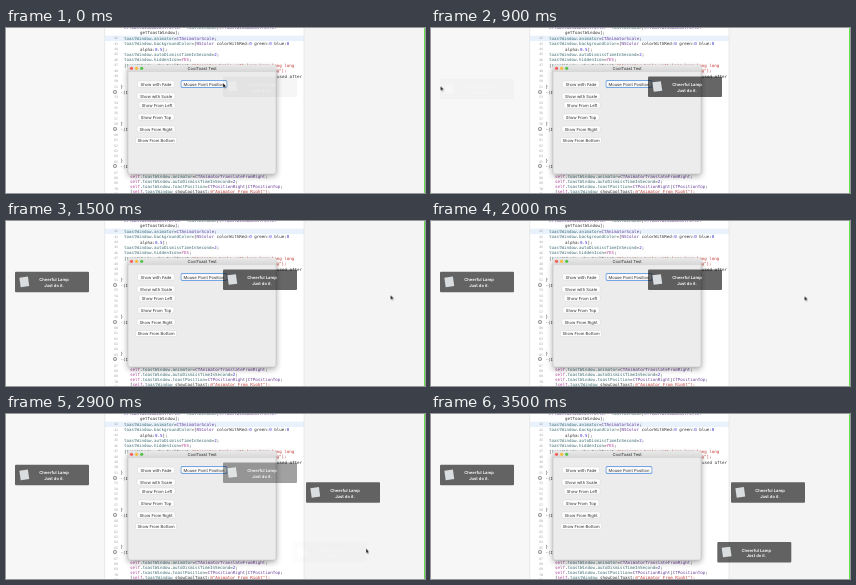
An HTML page for the animation above (3600 ms loop, 419 by 165 pixels).

```html
<!DOCTYPE html>
<html lang="en">
<head>
<meta charset="utf-8">
<title>Toast demo</title>
<style>
html, body { margin: 0; width: 100%; height: 100%; overflow: hidden; background: #f6f6f6; }
svg { display: block; width: 419px; height: 165px; }
text { text-rendering: geometricPrecision; white-space: pre; }
.code { font: 4.16px "DejaVu Sans Mono", monospace; fill: #333; }
.num { font: 3.2px "DejaVu Sans Mono", monospace; fill: #a2a2a2; text-anchor: end; }
.ui { font: 4.15px Inter, "Liberation Sans", sans-serif; fill: #2b2b2b; text-anchor: middle; }
.str { fill: #c43a34; }
.key { fill: #b0409a; }
.val { fill: #3a35cf; }
.type { fill: #6a3f99; }
.var { fill: #3f6e74; }
.btn { fill: #fff; stroke: #cfcfcf; stroke-width: .4; }
.toast text { fill: #fff; }
.toast .head { font-weight: 600; }

.toast, .cursor { animation: 3.6s linear infinite; }
#t1 { animation-name: first; }
#t2 { animation-name: second; }
#t3 { animation-name: third; }
#t4 { animation-name: fourth; }
.cursor { animation-name: roam; }

@keyframes first {
  0% { opacity: .06; }
  8.33% { opacity: .68; }
  15.28%, 75% { opacity: 1; }
  80.56% { opacity: .62; }
  88.89%, 100% { opacity: 0; }
}
@keyframes second {
  0%, 24.3% { opacity: 0; }
  25% { opacity: .03; }
  33.33% { opacity: .65; }
  39.5%, 100% { opacity: 1; }
}
@keyframes third {
  0%, 55.55% { opacity: 0; }
  63.89% { opacity: .55; }
  70.8%, 100% { opacity: 1; }
}
@keyframes fourth {
  0%, 80% { opacity: 0; }
  80.56% { opacity: .02; }
  88.89% { opacity: .65; }
  95.5%, 100% { opacity: 1; }
}
@keyframes roam {
  0%, 8.5% { transform: translate(217px, 55px); animation-timing-function: ease-in-out; }
  16.7%, 31% { transform: translate(9.5px, 58px); animation-timing-function: ease-in-out; }
  40%, 43% { transform: translate(384.5px, 74px); animation-timing-function: ease-in-out; }
  52%, 70% { transform: translate(373.5px, 75px); animation-timing-function: ease-in-out; }
  78%, 86% { transform: translate(360px, 134.5px); animation-timing-function: ease-in; }
  95%, 100% { transform: translate(391px, 168px); }
}
</style>
</head>
<body>
<svg viewBox="0 0 419 165">
  <defs>
    <filter id="blur" x="-20%" y="-20%" width="140%" height="140%"><feGaussianBlur stdDeviation="3"/></filter>
    <linearGradient id="bar" x2="0" y2="1">
      <stop stop-color="#e9e9e9"/><stop offset="1" stop-color="#d8d8d8"/>
    </linearGradient>
  </defs>
  <rect width="419" height="165" fill="#f7f7f7"/>
  <rect x="298" width="121" height="165" fill="#f4f4f4"/>
  <rect x="99" width="199" height="165" fill="#fff"/>
  <rect x="99" y="7.7" width="199" height="5.4" fill="#e9f2fc"/>
  <path d="M98.7 0V165M298 0V165" stroke="#dedede" stroke-width=".6"/>
  <g id="code"></g>

  <rect x="122" y="40" width="148" height="108" rx="2" opacity=".38" filter="url(#blur)"/>
  <rect x="122" y="37" width="148" height="109" rx="2" fill="#ececec" stroke="#bdbdbd" stroke-width=".5"/>
  <path d="M122 43.5V39q0-2 2-2h144q2 0 2 2v4.5z" fill="url(#bar)"/>
  <path d="M122 43.6H270" stroke="#c4c4c4" stroke-width=".4"/>
  <circle cx="125.5" cy="40.3" r="1.6" fill="#f5615a"/>
  <circle cx="130.6" cy="40.3" r="1.6" fill="#f3bd3e"/>
  <circle cx="135.7" cy="40.3" r="1.6" fill="#55c34a"/>
  <text class="ui" x="196" y="41.9">CoolToast Test</text>
  <g id="buttons"></g>
  <g id="toasts"></g>
  <path class="cursor" d="M0 0V4.7L1.1 3.7L1.9 5.4L2.7 5L1.9 3.4H3.4Z" fill="#111" stroke="#fff" stroke-width=".35"/>
  <rect x="418" width="1" height="165" fill="#66e04c"/>
</svg>
<script>
const el = id => document.getElementById(id);
const escape = s => s.replace(/&/g, "&amp;").replace(/</g, "&lt;");
const kinds = ["str", "key", "type", "var", "val"];
const token = /(@".*)|\b(self|YES)\b|\b(NSColor|CT\w+)|\b(toastWindow|animator|backgroundColor|autoDismissTimeInSecond|hiddenIcon|toastPosition)\b|\b(\d[\d.]*)/g;

const paint = s => escape(s).replace(token, (m, ...g) =>
  `<tspan class="${kinds[g.slice(0, 5).findIndex(Boolean)]}">${m}</tspan>`);
const line = (x, y, s) => `<text class="code" x="${x}" y="${y + 1.5}">${paint(s)}</text>`;

// Source lines: left edge, vertical centre, text
const lines = [
  [118, -.7, "CTToastWindowController *toastWindow=[CTToastWindowController"],
  [134, 4.7, "getToastWindow];"],
  [118, 10.2, "toastWindow.animator=CTAnimatorScale;"],
  [118, 15.7, "toastWindow.backgroundColor=[NSColor colorWithRed:0 green:0 blue:0"],
  [134, 21, "alpha:0.5];"],
  [118, 26.4, "toastWindow.autoDismissTimeInSecond=2;"],
  [118, 31.8, "toastWindow.hiddenIcon=YES;"],
  [118, 37.2, '[toastWindow showCoolToast:@"Animator Scale,with long long long long'],
  [271, 48, "used after"],
  [124, 148.6, "self.toastWindow.animator=CTAnimatorTranslateFromRight;"],
  [124, 153.6, "self.toastWindow.autoDismissTimeInSecond=2;"],
  [124, 158.5, "self.toastWindow.toastPosition=CTPositionRight|CTPositionTop;"],
  [124, 163.6, '[self.toastWindow showCoolToast:@"Animator From Right"];']
];
let code = lines.map(l => line(...l)).join("");
code += `<text class="code str" x="263" y="44.1">long"];</text>`;
for (const y of [58, 95, 132])
  code += line(114.5, y, "}") + line(114.5, y + 6, "-(I") +
    `<circle cx="109" cy="${y + 6}" r="1.7" fill="#fff" stroke="#777" stroke-width=".7"/><circle cx="109" cy="${y + 6}" r=".6" fill="#777"/>`;
for (let i = 0; i < 30; i++) {
  const y = 10.2 + i * 5.37;
  if ([64, 101, 138].every(m => Math.abs(y - m) > 3))
    code += `<text class="num" x="112" y="${y + 1.1}">${42 + i}</text>`;
}
el("code").innerHTML = code;

const button = (x, y, w, label) =>
  `<rect class="btn" x="${x - w / 2}" y="${y - 3}" width="${w}" height="6" rx="1.2"/>
   <text class="ui" x="${x}" y="${y + 1.5}">${label}</text>`;
el("buttons").innerHTML =
  `<rect x="174.7" y="52" width="46.6" height="8" rx="1.8" fill="#5b9be8"/>` +
  button(198, 56, 45, "Mouse Point Position") +
  [[150, 56, 37, "Fade", "with"], [150, 68, 38, "Scale", "with"], [151, 77, 36, "Left", "From"],
   [150, 89, 36, "Top", "From"], [150, 101, 38, "Right", "From"], [150, 112.5, 41, "Bottom", "From"]]
    .map(([x, y, w, name, how]) => button(x, y, w, `Show ${how} ${name}`)).join("");

const toast = ([x, y], i) =>
  `<g class="toast" id="t${i + 1}"><g transform="translate(${x} ${y})">
    <rect width="74" height="20.5" rx="1" fill="#000" fill-opacity=".6"/>
    <rect x="5" y="5.2" width="8.6" height="9.6" fill="#d9dddf" transform="rotate(-8 9.3 10)"/>
    <text class="ui head" x="39" y="9.6">Cheerful Lamp</text>
    <text class="ui head" x="39" y="15.3">Just do it.</text>
  </g></g>`;
el("toasts").innerHTML = [[217, 48.5], [9, 50.8], [300, 68.3], [286.3, 128]].map(toast).join("");
</script>
</body>
</html>
```
